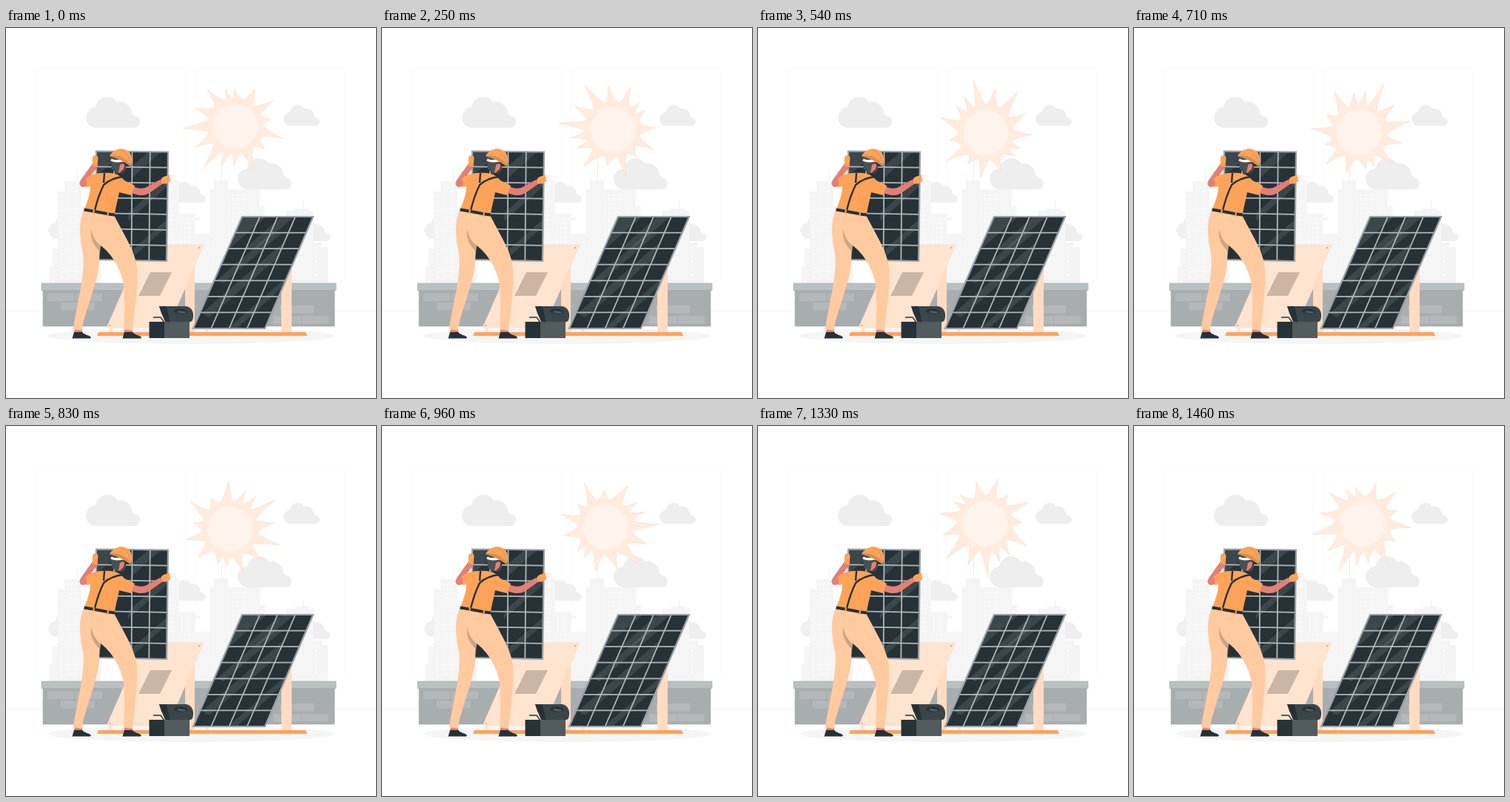
Write an HTML page with a canvas that moves like this. It is 500x500 px and loops after 1.5 s.

```html
<!DOCTYPE html>
<html lang="en">
<head>
<meta charset="utf-8">
<title>Solar panels</title>
<style>
html, body { margin: 0; width: 100%; height: 100%; overflow: hidden; background: #fff; }
canvas { display: block; width: 500px; height: 500px; }
</style>
</head>
<body>
<canvas id="stage" width="500" height="500"></canvas>
<script>
const ctx = document.getElementById('stage').getContext('2d');
const LOOP = 1500, STEPS = 36;
const INK = '#263238', ORANGE = '#ffa359', PANTS = '#ffca9f', SKIN = '#e57f75', PALE = '#ffe4d0';

function fill(d, color) {
  ctx.fillStyle = color;
  ctx.fill(new Path2D(d));
}

function line(d, color, width = 1) {
  ctx.strokeStyle = color;
  ctx.lineWidth = width;
  ctx.stroke(new Path2D(d));
}

function rect(x, y, w, h, color) {
  ctx.fillStyle = color;
  ctx.fillRect(x, y, w, h);
}

function ellipse(x, y, rx, ry, color, turn = 0) {
  ctx.fillStyle = color;
  ctx.beginPath();
  ctx.ellipse(x, y, rx, ry, turn, 0, Math.PI * 2);
  ctx.fill();
}

function cloud(x, y, scale, color = '#eeeeee') {
  ctx.save();
  ctx.translate(x, y);
  ctx.scale(scale, scale);
  for (const [cx, cy, r] of [[14, 28, 14], [29, 16, 16], [46, 23, 16], [65, 34, 8]]) ellipse(cx, cy, r, r, color);
  rect(14, 24, 51, 18, color);
  ctx.restore();
}

function tower(x, y, w, windows = true) {
  rect(x, y, w, 345 - y, '#f5f5f5');
  if (!windows) return;
  for (let wy = y + 6; wy < 338; wy += 6)
    for (let wx = x + 4; wx < x + w - 4; wx += 5) rect(wx, wy, 2.5, 3, '#fafafa');
}

function skyline() {
  cloud(57, 253, 0.75, '#f0f0f0');
  cloud(221, 208, 0.67, '#efefef');
  cloud(389, 260, 0.67, '#efefef');
  tower(58, 322, 12, false);
  tower(63, 298, 10, false);
  tower(70, 221, 32);
  tower(79, 207, 22);
  rect(96, 192, 1, 16, '#f2f2f2');
  tower(102, 240, 26);
  tower(215, 198, 14);
  tower(229, 206, 5, false);
  tower(232, 251, 23);
  rect(255, 256, 7, 4, '#f5f5f5');
  tower(254, 278, 23, false);
  tower(276, 218, 53);
  tower(281, 206, 19, false);
  rect(290.5, 165, 1.5, 42, '#f1f1f1');
  tower(328, 218, 15);
  tower(342, 242, 8, false);
  tower(378, 247, 37);
  tower(390, 244, 20, false);
  rect(401, 235, 1.5, 10, '#f1f1f1');
  tower(414, 290, 13);
  tower(427, 296, 8, false);
}

function wall() {
  rect(50, 354, 394, 49, '#a8adaf');
  for (const [x, y, w] of [[56, 358.5, 36], [94, 358.5, 36], [74, 371, 46], [370, 375, 46], [361, 389, 38], [400, 389, 36]])
    rect(x, y, w, 10.5, '#b4b8ba');
  rect(48, 345, 398, 9.5, '#babfc1');
  line('M48 345H446V354.5H48Z', '#a6acaf', 0.7);
  line('M50 354V403H444V354', '#9fa5a8', 0.6);
}

// Corners run clockwise from the top left.
function panel(a, b, c, d, shine) {
  const mix = (p, q, k) => [p[0] + (q[0] - p[0]) * k, p[1] + (q[1] - p[1]) * k];
  const outline = `M${a}L${b}L${c}L${d}Z`;
  fill(outline, INK);
  ctx.save();
  ctx.clip(new Path2D(outline));
  for (const band of shine) fill(band, 'rgba(255,255,255,.1)');
  for (let i = 1; i < 4; i++) line(`M${mix(a, b, i / 4)}L${mix(d, c, i / 4)}`, '#b0b6b9', 1.8);
  for (let i = 1; i < 7; i++) line(`M${mix(a, d, i / 7)}L${mix(b, c, i / 7)}`, '#b0b6b9', 1.8);
  ctx.restore();
  line(outline, '#9aa1a4', 2.2);
}

function supports() {
  ellipse(250, 416, 194, 11, '#f5f5f5');
  fill('M125 411H405L407 416H123Z', ORANGE);
  rect(242, 318, 13, 93, '#ffdcc1');
  rect(372, 320, 14, 91, '#ffdcc1');
  rect(269, 405, 5, 6, PALE);
  rect(139, 404, 5, 7, PALE);
  fill('M185 293H267L219 405H136Z', PALE);
  line('M185 293H267L219 405H136Z', '#f9dcc6', 0.7);
  fill('M195 330H224L208 362H179Z', '#cbb6a6');
  ellipse(261, 297, 1, 1, '#c69b7c');
  ellipse(140.5, 402, 1, 1, '#c69b7c');
}

function worker() {
  // Legs and shoes
  fill('M93 406H103V412H92ZM160 406H171V412H160Z', SKIN);
  fill('M92 410.5C96 412 100 410 103 411C106 415 113 415 115 418L114 419.5H89.5Z', INK);
  fill('M160 410.5C164 412 168 410 171 411C174 415 181 415 183 418L182 419.5H157.5Z', INK);
  fill('M105 246C98 262 99 282 104 305C107 330 99 360 90.5 407L102 409C108 380 122 347 125 325C127 310 126 300 128 294C138 301 154 320 158.5 345C161 365 160 390 159 407.5L171 409C174 380 178 350 177.5 330C177 306 163 286 146 253Z', PANTS);
  fill('M116 271C113 284 117 291 127 302L128 294C120 288 116 280 116 271Z', '#c9a585');
  // Far arm
  fill('M117 183L124 187L113 202L110 214L103 215C98 213 99 208 102 204Z', SKIN);
  fill('M118 173C121 171 124 172 124.5 176L123.5 187L117 186C117 181 116 177 118 173Z', ORANGE);
  // Near arm
  fill('M172 214C180 218 186 217 190 215L208 205L212 210L194 223C186 228 176 226 167 222Z', SKIN);
  fill('M209 205C212 200 216 200 221 199L222 207C219 210 214 210 210 210Z', ORANGE);
  // Shirt
  fill('M108 203C117 196 130 195 142 196C151 197 156 201 160 206L174 213L169 226L153 222C151 233 148 242 147 251L106 245C111 232 114 223 114 214L109 215C110 211 108 207 108 203Z', ORANGE);
  line('M133 196L132 209M158 201C148 202 139 206 132 212C126 224 123 234 120 246', INK, 2.4);
  line('M105.5 245.5C119 247 132 251 147 252.5', INK, 4);
  line('M119 245L118 251M138 249L137 255', ORANGE, 2);
  // Head and helmet
  fill('M141 175C147 172 157 175 161 181C164 186 162 192 157 195L150 197L143 191Z', '#465156');
  fill('M154 185C160 181 163 186 161 191C159 195 156 197 152 195Z', SKIN);
  line('M155 195C161 192 162 186 160 180', INK, 1.5);
  line('M142 178C147 181 153 180 159 179', '#fff', 3);
  fill('M140 173C145 163 158 160 166 167C171 172 171 181 168 187C161 181 151 176 140 173Z', ORANGE);
  fill('M141 172.5C151 171 162 175 169 185L168 187C160 180 150 176 141 172.5Z', '#d98b4a');
  line('M153 164C160 165 166 171 168 181', '#e08f48', 1);
}

function toolbox() {
  line('M199 391H209L214 398', INK, 1.3);
  fill('M207 376H244C252 378 255 386 252 395Q250 398 246 397H216L210 385Z', '#3b464b');
  fill('M207 376H216C220 384 219 391 222 397H215L210 385Z', INK);
  ellipse(236, 383, 9, 3.6, INK, 0.08);
  ellipse(237, 384, 6, 1.6, '#535d62', 0.08);
  rect(193.5, 397, 20.5, 22, INK);
  rect(214, 397, 34, 22, '#515b60');
}

function background() {
  rect(0, 0, 500, 500, '#fff');
  line('M39.5 340V59Q39.5 55.5 43 55.5H239Q242.5 55.5 242.5 59V340M255.5 340V59Q255.5 55.5 259 55.5H454Q457.5 55.5 457.5 59V340', '#fafafa');
  line('M0 382.5H500', '#f5f5f5');
  skyline();
  cloud(108, 93, 1);
  cloud(375, 104, 0.67);
  cloud(313, 176, 1);
}

// Ray tips as [degrees, distance from the pivot].
const rays = [
  [10.6, 68], [33, 50], [64.5, 62], [89, 50], [107, 52], [127, 68], [154, 56], [181, 67.5],
  [209, 58], [237, 63.5], [259, 54], [272, 54.5], [299, 62.5], [325, 67], [346, 53]
];
const disc = [3.2, -3.8];

function sunOutline() {
  const polar = (deg, r, [x, y] = [0, 0]) =>
    [x + r * Math.cos(deg * Math.PI / 180), y + r * Math.sin(deg * Math.PI / 180)];
  const count = rays.length;
  let d = '';
  rays.forEach(([deg, r], i) => {
    const before = rays[(i + count - 1) % count][0] - (i ? 0 : 360);
    const after = rays[(i + 1) % count][0] + (i === count - 1 ? 360 : 0);
    const start = (before + deg) / 2, end = (deg + after) / 2;
    const bend = side => polar(deg + (side - deg) * 0.4, 36 + (r - 36) * 0.22, [disc[0] * 0.7, disc[1] * 0.7]);
    const tip = polar(deg, r);
    if (!i) d += `M${polar(start, 36.5, disc)}`;
    d += `Q${bend(start)} ${tip}Q${bend(end)} ${polar(end, 36.5, disc)}`;
  });
  return d + 'Z';
}

const sunPath = sunOutline();

function sun(angle) {
  ctx.save();
  ctx.translate(306.8, 136.5);
  ctx.rotate(angle);
  fill(sunPath, '#ffecdf');
  line(sunPath, '#ffdfc9', 0.7);
  ellipse(...disc, 30.5, 30.5, '#fff4ec');
  ctx.restore();
}

function foreground() {
  wall();
  supports();
  panel([122, 166.5], [219, 167.5], [217, 315], [122, 313], [
    'M122 166H162L122 200Z', 'M170 187L193 167H210L170 203Z', 'M165 250L219 203V213L165 261Z', 'M165 305L219 257V267L170 311Z'
  ]);
  panel([319, 255], [415, 255], [350, 406], [253, 406], [
    'M319 255H352L303 297Z', 'M324 297L372 255H390L340 297Z', 'M285 341L360 276H374L294 345Z',
    'M265 385L375 290L368 310L274 391Z', 'M300 406L380 336L374 350L312 406Z'
  ]);
  worker();
  toolbox();
}

let shown = -1;
function frame(now) {
  // The sun turns in even ticks; the small lead absorbs timer rounding.
  const tick = Math.floor((now % LOOP + 3.4) / (LOOP / STEPS)) % STEPS;
  if (tick !== shown) {
    shown = tick;
    background();
    sun(tick / STEPS * Math.PI * 2);
    foreground();
  }
  requestAnimationFrame(now => frame(Math.max(0, now - begin)));
}

const begin = performance.now();
frame(0);
</script>
</body>
</html>
```
